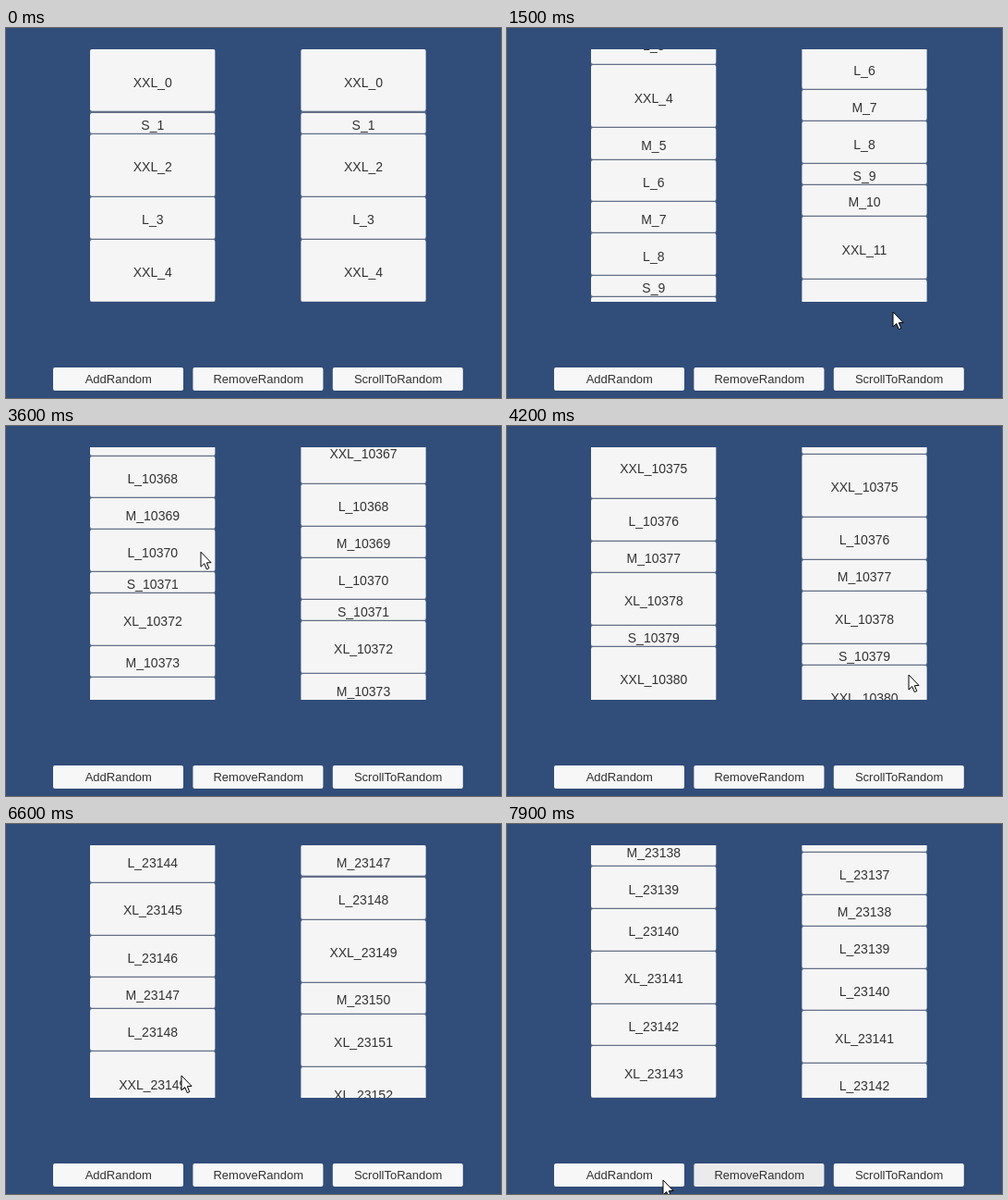
An HTML page with a canvas that plays this animation: 536 px wide and 400 px high, repeating every 8 s.

```html
<!DOCTYPE html>
<html lang="en">
<head>
<meta charset="utf-8">
<title>Two endless lists</title>
<style>
  html, body { margin: 0; width: 100%; height: 100%; overflow: hidden; background: #314d79; }
  canvas { display: block; width: 536px; height: 400px; }
</style>
</head>
<body>
<canvas id="stage"></canvas>
<script>
const W = 536, H = 400, LOOP = 8000, STEP = 100;
const UNIT = 11.4, TOP = 23.2, BOTTOM = 296, LIST_W = 135.6;
const FONT = '"Liberation Sans", Arial, sans-serif';
const SIZE_NAME = { 2: 'S', 3: 'M', 4: 'L', 5: 'XL', 6: 'XXL' };
const LIST_X = { left: 91, right: 319.2 };

// Stretches of the list, one digit per item height; `top` is the item jumped to
const RUNS = [
  { at: 0, first: 0, top: 0, sizes: '6264634342366454' },
  { at: 2100, first: 10364, top: 10364, sizes: '456643425366435265543652422344264' },
  { at: 5000, first: 23134, top: 23147, sizes: '4354344545454346355436' }
];

// Each flick drags a list with the pointer, then lets it glide on
const FLICKS = [
  { list: 'left', at: 300, ms: 150, x: 165, y: 240, drag: 100, glide: 101.2 },
  { list: 'right', at: 900, ms: 150, x: 420, y: 285, drag: 120, glide: 320 },
  { list: 'right', at: 2900, ms: 150, x: 405, y: 239, drag: 80, glide: 180 },
  { list: 'left', at: 3350, ms: 150, x: 165, y: 230, drag: 126, glide: 576.3 },
  { list: 'right', at: 4000, ms: 100, x: 395, y: 265, drag: 125, glide: 1004.5 },
  { list: 'left', at: 6400, ms: 200, x: 190, y: 129.4, drag: -142.6, glide: -301.5 },
  { list: 'right', at: 7000, ms: 200, x: 390, y: 80, drag: -170, glide: -419.8 }
];

const BUTTONS = ['AddRandom', 'RemoveRandom', 'ScrollToRandom']
  .map((text, i) => ({ text, x: 51 + i * 151.4, y: 367, w: 141, h: 25 }));
const CLICKS = [1800, 4700, 5300, 6000], CLICK_MS = 200;

// Pointer stops between the flicks: time, x, y
const STOPS = [
  [100, 36, 230], [1500, 418, 307], [1700, 419, 374], [2300, 419, 374], [2400, 413, 375],
  [2800, 413, 374], [4200, 435, 269], [4400, 405, 376], [4600, 386, 384], [5000, 386, 384],
  [5200, 135, 384], [5450, 135, 384], [5700, 241, 393], [5800, 241, 393], [5900, 265, 384],
  [6200, 265, 384], [7600, 290, 374], [7800, 215, 384], [7900, 169, 385]
];
const PATH = STOPS.concat(...FLICKS.map(f => [
  [f.at, f.x, f.y], [f.at + f.ms, f.x, f.y - f.drag]
])).sort((a, b) => a[0] - b[0]);

const ARROW = [[0, 0], [0, 16], [3.7, 12.6], [6.3, 18.6], [8.8, 17.5], [6.3, 11.7], [11, 11.4]];

const canvas = document.getElementById('stage');
const ctx = canvas.getContext('2d');
const ratio = window.devicePixelRatio || 1;
canvas.width = W * ratio;
canvas.height = H * ratio;
ctx.scale(ratio, ratio);
ctx.textAlign = 'center';

function pointerAt(t) {
  const i = PATH.findIndex(stop => stop[0] > t);
  if (i === 0) return { x: -50, y: -50 };
  const a = PATH.at(i < 0 ? -1 : i - 1), b = PATH.at(i);
  const p = a === b ? 0 : (t - a[0]) / (b[0] - a[0]);
  return { x: a[1] + (b[1] - a[1]) * p, y: a[2] + (b[2] - a[2]) * p };
}

// Friction takes the gliding speed down by a factor e^2 each second
function travel(flick, end) {
  const held = Math.min(1, (end - flick.at) / flick.ms);
  const free = Math.max(0, end - flick.at - flick.ms);
  return flick.drag * held + flick.glide * (1 - Math.exp(-free / 500));
}

function offsetAt(list, run, t) {
  const above = [...run.sizes].slice(0, run.top - run.first);
  const origin = above.reduce((sum, size) => sum + size * UNIT, 0);
  const flicks = FLICKS.filter(f => f.list === list && f.at >= run.at && f.at <= t);
  return flicks.reduce((sum, f, i) => {
    const next = flicks[i + 1];
    return sum + travel(f, next ? next.at : t);
  }, origin);
}

function box(x, y, w, h, fill) {
  ctx.fillStyle = fill;
  ctx.beginPath();
  ctx.roundRect(x, y, w, h, 2);
  ctx.fill();
}

function label(text, x, y, size) {
  ctx.font = `${size}px ${FONT}`;
  ctx.fillStyle = '#323232';
  ctx.fillText(text, x, y);
}

function drawList(list, t) {
  const x = LIST_X[list];
  const run = RUNS.filter(r => r.at <= t).pop();
  let y = TOP - offsetAt(list, run, t);
  ctx.save();
  ctx.beginPath();
  ctx.rect(x, 23, LIST_W, BOTTOM - 23);
  ctx.clip();
  [...run.sizes].forEach((size, i) => {
    const h = size * UNIT, top = Math.floor(y), bottom = Math.floor(y + h);
    if (bottom >= 23 && top < BOTTOM) {
      ctx.fillStyle = '#626f86';
      ctx.fillRect(x, bottom - 1, LIST_W, 2);
      box(x, top + (y > TOP - 0.1 && y < TOP + 0.1 ? 0 : 1), LIST_W, bottom - top - 1.3, '#f5f5f5');
      label(`${SIZE_NAME[size]}_${run.first + i}`, x + LIST_W / 2, Math.round(y + h / 2 + 6.8), 14);
    }
    y += h;
  });
  ctx.restore();
}

// Buttons answer the pointer one step late
function drawButton({ text, x, y, w, h }, t) {
  const seen = t - STEP, p = pointerAt(seen);
  const over = p.x >= x && p.x <= x + w && p.y >= y && p.y <= y + h;
  const pressed = over && CLICKS.some(c => seen >= c && seen < c + CLICK_MS);
  box(x, y, w, h, pressed ? '#c8c8c8' : over ? '#ebebeb' : '#f7f7f7');
  label(text, x + w / 2 + 0.3, 384, 13);
}

function drawPointer(t) {
  const p = pointerAt(t);
  ctx.beginPath();
  ARROW.forEach(([x, y]) => ctx.lineTo(p.x + x, p.y + y));
  ctx.closePath();
  ctx.fillStyle = '#fff';
  ctx.strokeStyle = '#000';
  ctx.lineWidth = 1;
  ctx.fill();
  ctx.stroke();
}

function draw(t) {
  ctx.fillStyle = '#314d79';
  ctx.fillRect(0, 0, W, H);
  Object.keys(LIST_X).forEach(list => drawList(list, t));
  BUTTONS.forEach(button => drawButton(button, t));
  drawPointer(t);
}

const start = performance.now();
function tick() {
  const t = (performance.now() - start) % LOOP;
  draw(Math.floor(t / STEP) * STEP);
  requestAnimationFrame(tick);
}
tick();
</script>
</body>
</html>
```
